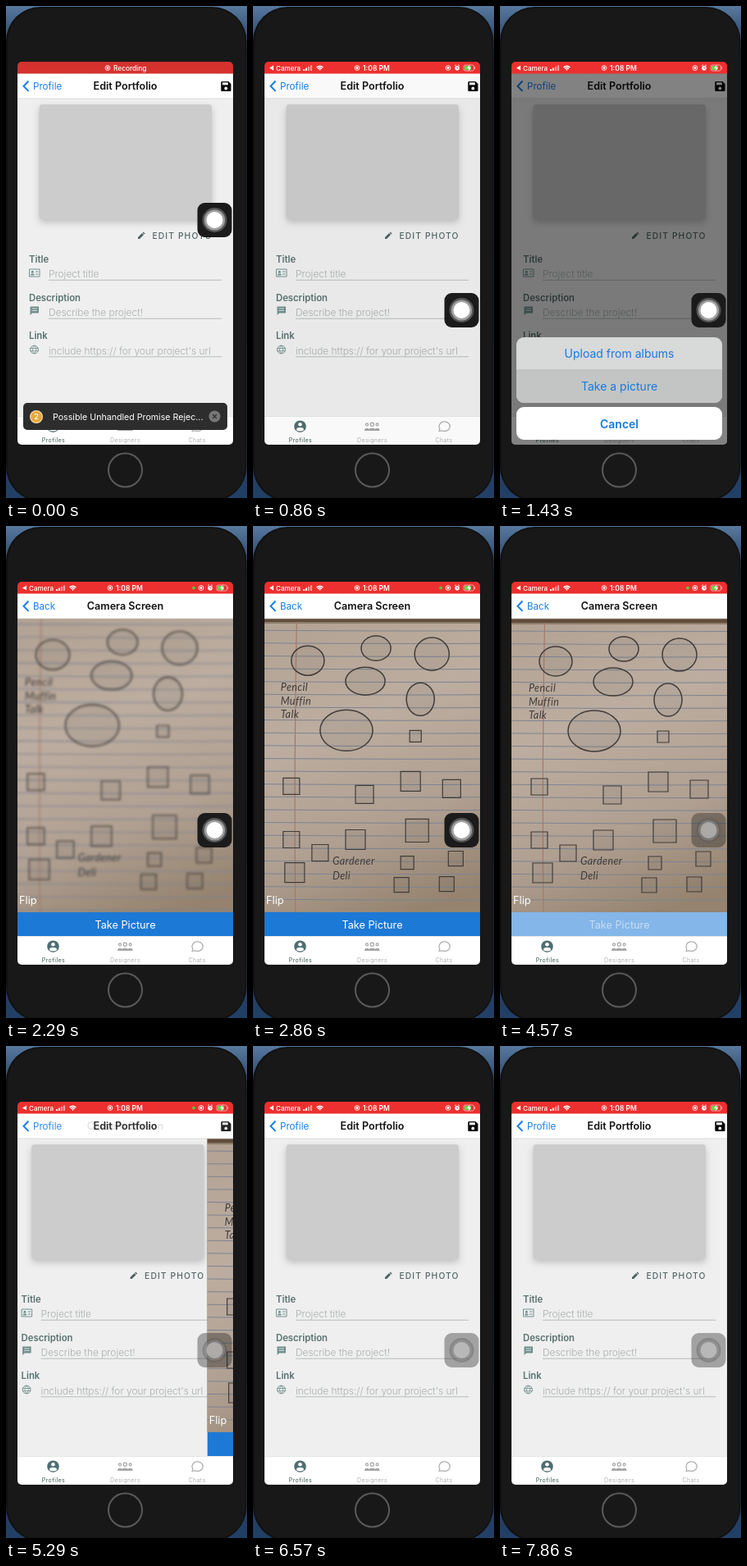
Write an HTML page with a canvas that moves like this. It is 294 px wide and 600 px high and loops after 8 s.

```html
<!DOCTYPE html>
<html lang="en">
<head>
<meta charset="utf-8">
<title>Portfolio photo flow</title>
<style>
html, body { margin: 0; width: 100%; height: 100%; overflow: hidden; background: #16243c; }
canvas { display: block; width: 294px; height: 600px; }
</style>
</head>
<body>
<canvas id="stage"></canvas>
<script>
const LOOP = 8000, FPS = 7;
const BLUE = '#1a7fe8', TEAL = '#58716f', GREY = '#b1b1b1';
const canvas = document.getElementById('stage');
const c = canvas.getContext('2d');
const dpr = window.devicePixelRatio || 1;
canvas.width = 294 * dpr;
canvas.height = 600 * dpr;

const ramp = (t, a, b) => Math.min(1, Math.max(0, (t - a) / (b - a)));
const easeOut = u => 1 - (1 - u) ** 3;
const easeInOut = u => u * u * (3 - 2 * u);

function group(draw, { x = 0, y = 0, alpha = 1 } = {}) {
  if (alpha <= 0) return;
  c.save();
  c.translate(x, y);
  c.globalAlpha *= alpha;
  draw();
  c.restore();
}
function text(s, x, y, size, color, { weight = 400, align = 'left', spacing = 0, font = 'Inter, sans-serif', style = '' } = {}) {
  c.font = `${style} ${weight} ${size}px ${font}`;
  c.textAlign = align;
  c.letterSpacing = spacing + 'px';
  c.fillStyle = color;
  c.fillText(s, x, y);
}
function box(x, y, w, h, color, r = 0) {
  c.fillStyle = color;
  c.beginPath();
  c.roundRect(x, y, w, h, r);
  c.fill();
}
function dot(x, y, r, color) {
  c.fillStyle = color;
  c.beginPath();
  c.arc(x, y, r, 0, 7);
  c.fill();
}
function ring(x, y, r, color, width = 1) {
  c.strokeStyle = color;
  c.lineWidth = width;
  c.beginPath();
  c.arc(x, y, r, 0, 7);
  c.stroke();
}
function path(d, color, width = 0) {
  const p = new Path2D(d);
  if (width) {
    c.strokeStyle = color;
    c.lineWidth = width;
    c.stroke(p);
  } else {
    c.fillStyle = color;
    c.fill(p);
  }
}

function phone() {
  const sky = c.createLinearGradient(0, 0, 0, 600);
  sky.addColorStop(0, '#57799f');
  sky.addColorStop(.1, '#1d3354');
  sky.addColorStop(1, '#223f66');
  c.fillStyle = sky;
  c.fillRect(0, 0, 294, 600);
  box(0, 1, 293.5, 603, '#111', 42);
  box(2, 3, 290, 599, '#181818', 40);
  ring(145.5, 566, 20.5, '#5a5a5a', 2);
}

function statusBar(t) {
  const recording = 1 - ramp(t, 400, 570);
  box(14, 68, 263, 14.5, recording > .5 ? '#d5322e' : '#ec302f');
  const target = x => { ring(x, 75.5, 2.9, '#fff', .9); dot(x, 75.5, 1.4, '#fff'); };
  group(() => {
    target(124);
    text('Recording', 131, 78.6, 8.3, '#fff', { weight: 500 });
  }, { alpha: recording });
  group(() => {
    path('M25 72.5v6l-5-3z', '#fff');
    text('Camera', 28, 78.6, 8.1, '#fff', { weight: 500 });
    for (let i = 0; i < 4; i++)
      box(61 + i * 3, 77 - i * 1.6, 2.1, 2 + i * 1.6, i < 2 ? '#fff' : '#ffffff88', .5);
    for (let i = 0; i < 3; i++) {
      c.beginPath();
      c.arc(81.5, 79, 1 + i * 2.3, -2.35, -.8);
      c.strokeStyle = '#fff';
      c.lineWidth = 1.6;
      c.stroke();
    }
    target(127);
    text('1:08 PM', 134, 78.7, 8.5, '#fff', { weight: 600 });
    if (t > 1850 && t < 6300) dot(229, 75.5, 1.9, '#56c83f');
    target(238);
    dot(249, 75.8, 2.8, '#fff');
    path('M246 73l2-1.5M252 73l-2-1.5M249 74v2h1.4', '#fff', .9);
    path('M249 74v2h1.4', '#d22', .7);
    c.strokeStyle = '#ffffffaa';
    c.lineWidth = .8;
    c.beginPath();
    c.roundRect(257, 72, 12.5, 7, 2);
    c.stroke();
    box(258, 73, 8, 5, '#65d54f', 1);
    box(270.2, 74.3, 1, 2.4, '#ffffffaa');
    path('M264.5 71l-3.3 5h2.3l-1 4 3.6-5.2h-2.4z', '#fff');
  }, { alpha: 1 - recording });
}

function saveIcon() {
  path('M263.5 92h8l3 3v8q0 1-1 1h-10q-1.2 0-1.2-1v-10q0-1 1.2-1z', '#050505');
  box(264, 93.3, 6.8, 3, '#fff');
  dot(268.3, 100.4, 1.9, '#fff');
}

function header(camera) {
  box(14, 82, 263, 31, '#fff');
  box(14, 112.5, 263, .7, '#d4d4d4');
  path('M27.5 91.5l-6 6.2 6 6.2', BLUE, 2);
  const title = s => text(s, 145.5, 102.3, 12.6, '#111', { weight: 600, align: 'center' });
  group(() => {
    text('Profile', 33, 102, 11.6, BLUE);
    title('Edit Portfolio');
    saveIcon();
  }, { alpha: 1 - camera });
  group(() => {
    text('Back', 33, 102, 11.6, BLUE);
    title('Camera Screen');
  }, { alpha: camera });
}

function field(label, placeholder, y) {
  text(label, 28, y, 11.3, TEAL, { weight: 600 });
  text(placeholder, 52, y + 18.5, 11.9, '#a9adad', { weight: 300 });
  box(52, y + 21.3, 211, .9, '#b9bcbc');
}

function portfolioForm() {
  box(14, 113, 263, 387, '#efefef');
  c.save();
  c.shadowColor = '#0003';
  c.shadowBlur = 9 * dpr;
  c.shadowOffsetY = 4 * dpr;
  box(40.5, 120, 210.5, 140, '#ccc', 4);
  c.restore();
  path('M161 284v-2l5-5 2 2-5 5zM166.6 276.5l1-1 2 2-1 1z', '#4c6260');
  text('EDIT PHOTO', 178.5, 284, 10.3, '#526563', { weight: 500, spacing: 1.1 });

  field('Title', 'Project title', 312.5);
  field('Description', 'Describe the project!', 359.5);
  field('Link', "include https:// for your project's url", 406);

  path('M28.5 321h12.5v9h-12.5zM36 324h3.5M36 327h3.5', '#71908d', 1);
  dot(32.3, 324.3, 1.5, '#71908d');
  box(30, 326.5, 4.6, 2, '#71908d', 1);
  path('M29.5 366.5h10.5v8h-8l-2.5 2.5z', '#71908d');
  path('M31.5 369h6.5M31.5 371.5h6.5', '#efefef', .8);
  ring(34.5, 419, 4.9, '#71908d');
  path('M29.6 417.5h9.8M29.6 420.7h9.8M34.5 414q-4.4 5 0 10q4.4-5 0-10', '#71908d', .8);
}

function pencilShape(x, y, rx, ry, square) {
  c.beginPath();
  if (square) c.rect(x - ry, y - ry, ry * 2, ry * 2);
  else c.ellipse(x, y, rx, ry, 0, 0, 7);
  c.fill();
  c.stroke();
}

// Notebook page seen by the camera: ruled paper with plain pencil shapes.
function notebook(t) {
  const focus = easeInOut(ramp(t, 2290, 3000));
  const loose = 1 - focus;
  c.save();
  c.beginPath();
  c.rect(14, 113, 263, 358);
  c.clip();
  const paper = c.createLinearGradient(60, 113, 200, 471);
  paper.addColorStop(0, '#b3a394');
  paper.addColorStop(.35, '#bcada0');
  paper.addColorStop(.7, '#b0a092');
  paper.addColorStop(1, '#95836f');
  c.fillStyle = paper;
  c.fillRect(14, 113, 263, 358);
  c.filter = loose > .02 ? `blur(${loose * 1.6 * dpr}px)` : 'none';
  c.translate(-12.8 * loose, -10.5 * loose);
  c.scale(1 + .026 * loose, 1 + .015 * loose);

  box(0, 105, 300, 13, '#604c39');
  box(0, 118, 300, 2, '#8d7b68');
  c.strokeStyle = '#7d8390';
  c.lineWidth = 1;
  c.beginPath();
  for (let y = 128; y < 490; y += 15.6) {
    c.moveTo(0, y);
    c.quadraticCurveTo(150, y + 1.5, 300, y + .5);
  }
  c.stroke();
  path('M54.5 118Q51 290 53 485', '#a8776b', 1.2);

  c.fillStyle = '#3a34300f';
  c.strokeStyle = '#423c39';
  c.lineWidth = 1.5;
  [[68, 165, 20, 18], [151, 150, 18, 15], [219, 157, 21, 20], [138, 190, 24, 17],
   [205, 212, 17, 20], [115, 250, 32, 25]].forEach(s => pencilShape(...s));
  c.lineWidth = 1.2;
  [[199, 257, 7], [48, 318, 10], [137, 328, 11], [193, 312, 12], [243, 321, 11],
   [48, 383, 10], [126, 383, 12], [201, 372, 14], [83, 399, 10], [52, 423, 12],
   [189, 411, 8], [248, 406, 9], [182, 438, 9], [237, 437, 9]]
    .forEach(([x, y, r]) => pencilShape(x, y, r, r, true));

  const note = (s, x, y) => text(s, x, y, 12.5, '#3f3a38', { style: 'italic', font: 'Lato, sans-serif', spacing: .4 });
  note('Pencil', 35, 202);
  note('Muffin', 35, 219);
  note('Talk', 35, 235);
  note('Gardener', 98, 413);
  note('Deli', 98, 431);
  c.restore();
}

function cameraScreen(t) {
  box(14, 113, 263, 387, '#fff');
  box(14, 113, 263, 358, '#111');
  group(() => notebook(t), { alpha: ramp(t, 1700, 2000) });
  text('Flip', 16, 461, 12.8, '#fff');
  const pressed = ramp(t, 4380, 4560) - ramp(t, 4640, 4850);
  group(() => {
    box(14, 471, 263, 29, '#1c79d6');
    text('Take Picture', 145.5, 490.5, 12.7, '#fff', { align: 'center' });
  }, { alpha: 1 - .46 * pressed });
}

function tabBar() {
  box(14, 500, 263, 35, '#fff');
  box(14, 500, 263, .7, '#dcdcdc');
  dot(57.5, 512.7, 7.3, '#4f6f70');
  dot(57.5, 510.2, 2.3, '#fff');
  c.fillStyle = '#fff';
  c.beginPath();
  c.ellipse(57.5, 516.2, 4.4, 2.2, 0, 0, 7);
  c.fill();
  for (const [x, r] of [[139, 1.8], [145.3, 2.4], [151.6, 1.8]]) {
    ring(x, 511 - r / 3, r - .3, '#a5a5a5', 1.2);
    box(x - r * 1.6, 515, r * 3.2, 3, '#a5a5a5', [2, 2, 0, 0]);
  }
  path('M227.2 518.5l.5-3.2a6.6 5.8 0 1 1 3 2.6z', GREY, 1.3);
  const label = (s, x, color, weight) => text(s, x, 532, 7, color, { align: 'center', weight, spacing: .4 });
  label('Profiles', 58, '#5a706f', 500);
  label('Designers', 145.5, GREY, 400);
  label('Chats', 233, GREY, 400);
}

function toast() {
  box(21, 484, 249, 33, '#2d2d2d', 5);
  dot(37, 501, 8, '#f4dca8');
  dot(37, 501, 6.8, '#e9a93d');
  text('2', 37, 504.3, 9, '#fff', { align: 'center', weight: 500 });
  text('Possible Unhandled Promise Rejec...', 57, 504.5, 10.65, '#fff');
  dot(254.5, 500.5, 7, '#777');
  path('M252 498l5 5M257 498l-5 5', '#2d2d2d', 1.1);
}

function actionSheet(t) {
  const shown = easeOut(ramp(t, 850, 1280)) * (1 - easeInOut(ramp(t, 1500, 1800)));
  if (!shown) return;
  group(() => {
    c.fillStyle = '#000';
    c.fillRect(14, 82, 263, 453);
  }, { alpha: .49 * shown });
  group(() => {
    const pressed = t > 1350;
    box(20, 404, 251, 80, '#d8d9d9', 9);
    if (pressed) box(20, 444, 251, 40, '#c3c5c5', [0, 0, 9, 9]);
    box(20, 443.6, 251, .7, '#b5b5b5');
    box(20, 489, 251, 40, '#fff', 9);
    const option = (s, y, weight = 400) => text(s, 145.5, y, 14, '#1879dc', { align: 'center', weight });
    option('Upload from albums', 429);
    option('Take a picture', 469);
    option('Cancel', 514.5, 600);
  }, { y: 140 * (1 - shown) });
}

function assistiveButton(t) {
  const y = 261 + 110 * easeInOut(ramp(t, 0, 570));
  group(() => {
    box(-21, -21, 42, 42, '#1b1b1b', 9);
    dot(0, 0, 15, '#555');
    dot(0, 0, 12.6, '#a0a0a0');
    dot(0, 0, 10, '#fff');
  }, { x: 254.5, y, alpha: 1 - .64 * ramp(t, 3250, 3850) });
}

function draw(t) {
  c.setTransform(dpr, 0, 0, dpr, 0, 0);
  phone();
  c.save();
  c.beginPath();
  c.roundRect(14, 68, 263, 467, 5);
  c.clip();
  const camera = t < 4000
    ? easeOut(ramp(t, 1570, 2200))
    : 1 - easeOut(ramp(t, 4930, 5630));
  group(portfolioForm, { x: -79 * camera });
  if (camera > 0) group(() => cameraScreen(t), { x: 263 * (1 - camera) });
  header(camera);
  tabBar();
  if (t < 650) toast();
  actionSheet(t);
  statusBar(t);
  assistiveButton(t);
  c.restore();
}

const start = performance.now();
function tick() {
  const t = (performance.now() - start) % LOOP;
  draw(Math.floor((t + 2) * FPS / 1000) * 1000 / FPS);
  requestAnimationFrame(tick);
}
tick();
</script>
</body>
</html>
```
